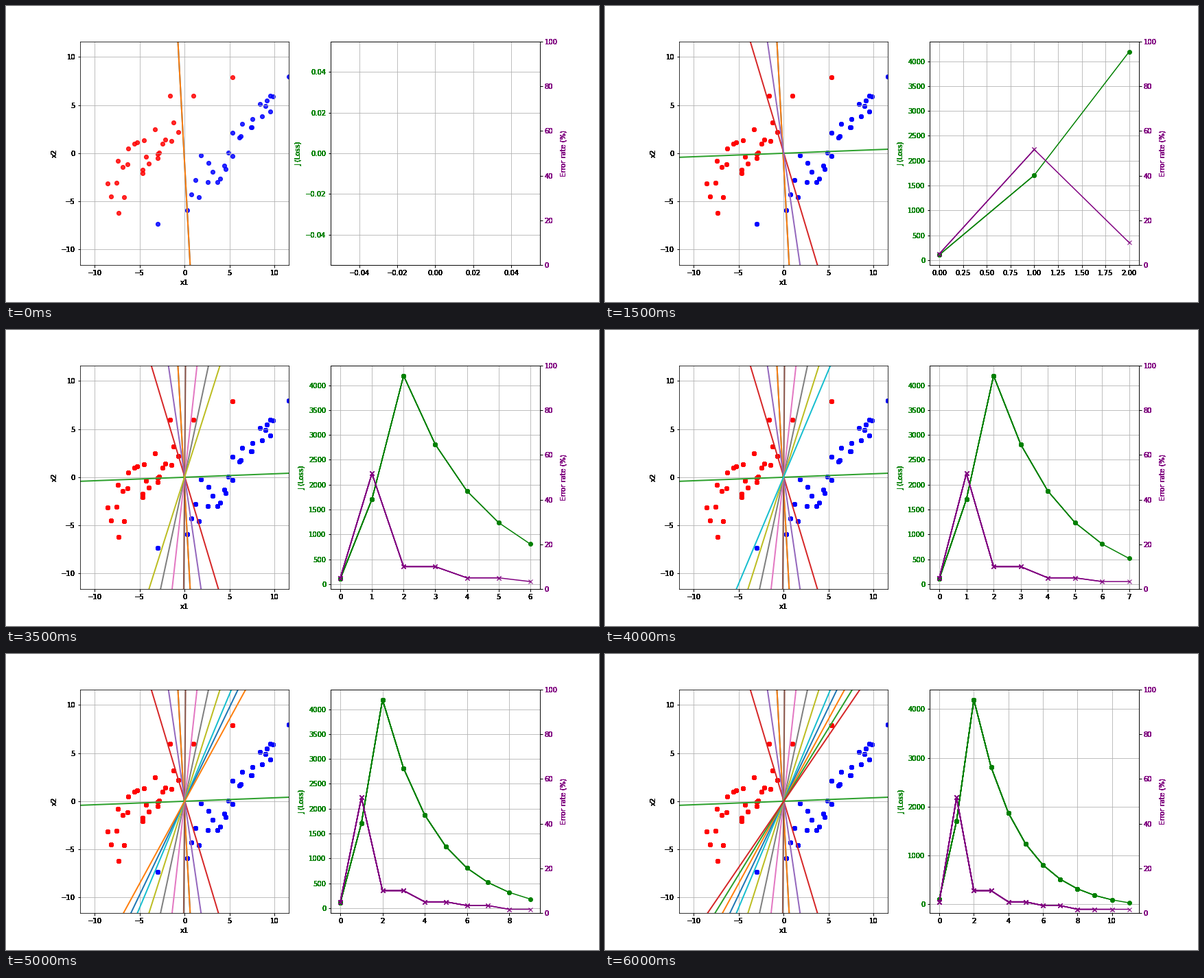
Recreate the animation shown at these times as a matplotlib script. Size 864 by 432 pixels, loop 6500 ms.

```python
import matplotlib.pyplot as plt
import numpy as np
from matplotlib.animation import FuncAnimation
from matplotlib.text import Text

FRAMES, INTERVAL = 13, 500
LIMIT = 11.607
TEXT_PASSES = 12
SAMPLES = 60

rng = np.random.default_rng(4)


def cluster(count, start, end, slope, offset, spread, outliers):
    """Points scattered along a straight trend, plus a few set apart."""
    x = np.linspace(start, end, count) + rng.normal(0, 0.25, count)
    y = slope * x + offset + rng.normal(0, spread, count)
    return np.vstack([np.column_stack([x, y]), outliers])


RED = cluster(26, -8.4, -0.8, 0.75, 3.3, 1.9, [(0.98, 5.98), (5.33, 7.9)])
BLUE = cluster(28, 0.5, 10.3, 1.05, -5.0, 1.2, [(-2.96, -7.35), (11.61, 7.97)])

# Each boundary is the pair of x where it meets the bottom and the top edge.
START = (0.62, -0.74)
FLAT = (-321, 321)
KEY_STEPS = [0, 2, 6, 7, 10]
KEY_BOTTOM = [3.76, -0.1, -5.24, -5.96, -8.44]
KEY_TOP = [-3.7, 0.11, 5.21, 5.94, 8.49]
turn = np.arange(FRAMES - 2)
BOUNDARIES = [START, START, FLAT, *zip(np.interp(turn, KEY_STEPS, KEY_BOTTOM),
                                       np.interp(turn, KEY_STEPS, KEY_TOP))]

# Loss and misses jump at first, then fall off.
LOSS = [106, 1708] + [4293 * 0.678 ** i - 100 for i in range(10)]
MISSES = [3, 31] + [6 // (1 + i // 2) for i in range(10)]
ERROR = [100 * m / SAMPLES for m in MISSES]

# Repeated passes harden the edges of the lettering.
draw_once = Text.draw


def draw_hard(self, renderer, *args, **kwargs):
    for _ in range(TEXT_PASSES):
        draw_once(self, renderer, *args, **kwargs)


Text.draw = draw_hard

plt.rcParams.update({"font.family": "DejaVu Sans", "font.size": 10,
                     "xtick.major.width": 1, "ytick.major.width": 1})

fig, (data_ax, loss_ax) = plt.subplots(1, 2, figsize=(12, 6), dpi=72)
fig.subplots_adjust(left=0.125, right=0.9, bottom=0.125, top=0.88, wspace=0.2)
error_ax = loss_ax.twinx()

data_ax.set(xlabel="x1", ylabel="x2")
data_ax.grid(True)
loss_ax.grid(True)
for ax, label, color in ((loss_ax, "J (Loss)", "green"),
                         (error_ax, "Error rate (%)", "purple")):
    ax.set_ylabel(label, color=color)
    ax.tick_params(axis="y", labelcolor=color)

artists = []


def padded(values):
    """Axis limits with a 5 % margin, widened when there is no spread."""
    lo, hi = min(values, default=0), max(values, default=0)
    if lo == hi:
        half = 0.05 * abs(lo) or 0.05
        lo, hi = lo - half, hi + half
    margin = 0.05 * (hi - lo)
    return lo - margin, hi + margin


def draw_boundaries(count):
    for points, color in ((RED, "red"), (BLUE, "blue")):
        for _ in range(count):
            artists.append(data_ax.scatter(*points.T, color=color, alpha=0.6))
    for i, ends in enumerate(BOUNDARIES[:count]):
        artists.extend(data_ax.plot(ends, [-LIMIT, LIMIT],
                                    color=f"C{i % 10}", lw=2))
    data_ax.set(xlim=(-LIMIT, LIMIT), ylim=(-LIMIT, LIMIT))


def draw_history(count):
    # Each step draws its whole history over the earlier ones.
    for k in range(1, count + 1):
        artists.extend(loss_ax.plot(range(k), LOSS[:k],
                                    color="green", marker="o"))
        artists.extend(error_ax.plot(range(k), ERROR[:k],
                                     color="purple", marker="x"))
    loss_ax.set(xlim=padded(range(count)), ylim=padded(LOSS[:count]))
    error_ax.set_ylim(0, 100)


def update(step):
    while artists:
        artists.pop().remove()
    draw_boundaries(step + 2)
    draw_history(step)
    return artists


anim = FuncAnimation(fig, update, frames=FRAMES, interval=INTERVAL,
                     repeat=True, repeat_delay=0, blit=False)
plt.show()
```
